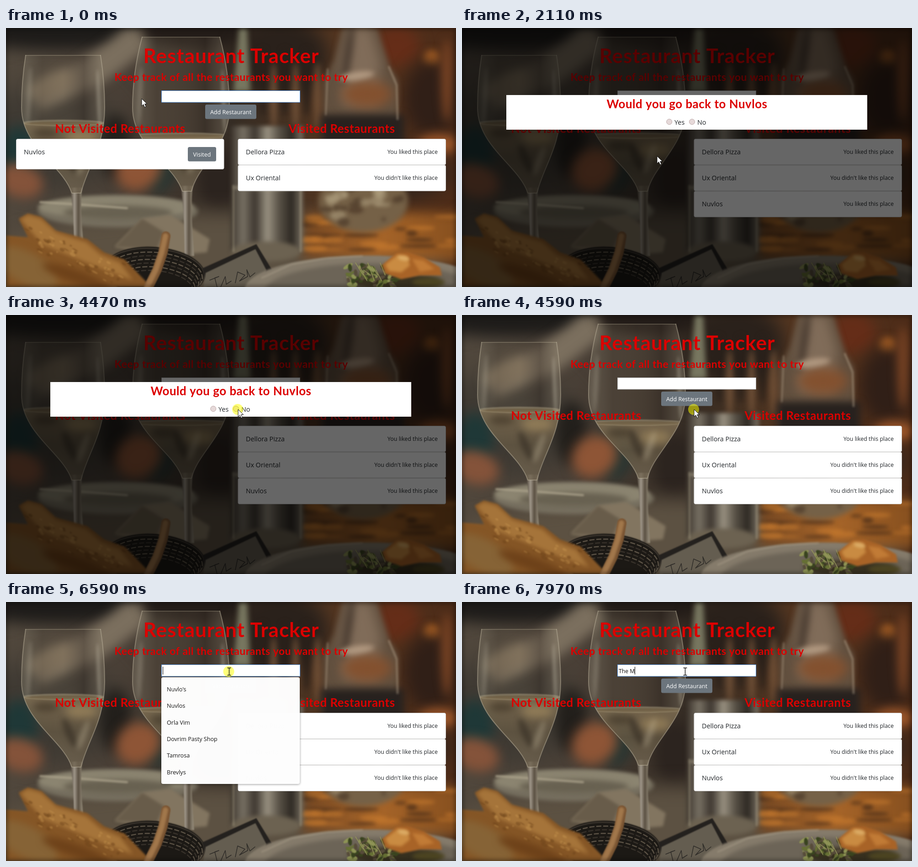
These frames come from a looping animation (985x568 px, 8 s). An HTML page with a canvas:

```html
<!DOCTYPE html>
<html lang="en">
<head>
<meta charset="utf-8">
<title>Restaurant Tracker</title>
<style>
html, body { margin: 0; width: 100%; height: 100%; overflow: hidden; background: #2b2621; }
canvas { display: block; }
</style>
</head>
<body>
<canvas id="stage" width="985" height="568"></canvas>
<script>
const W = 985, H = 568, LOOP = 8000;
const ctx = document.getElementById('stage').getContext('2d');
const DISPLAY = 'Lato, sans-serif', SANS = '"Open Sans", sans-serif';
const RED = '#dc0000', INK = '#212529';

// ---------- backdrop ----------
const photo = document.createElement('canvas');
photo.width = W; photo.height = H;
const g = photo.getContext('2d');

const blur = b => { g.filter = b ? `blur(${b}px)` : 'none'; };

function blob(x, y, rx, ry, color, b = 0, rot = 0) {
  blur(b);
  g.fillStyle = color;
  g.beginPath();
  g.ellipse(x, y, rx, ry, rot, 0, 7);
  g.fill();
}

function trace(str) {
  const p = str.split(' ').map(s => s.split(',').map(Number));
  g.beginPath();
  p.forEach(([x, y]) => g.lineTo(x, y));
}

function poly(str, color, b = 0) {
  blur(b);
  trace(str);
  g.fillStyle = color;
  g.fill();
}

function line(str, color, w, b = 0) {
  blur(b);
  trace(str);
  g.strokeStyle = color;
  g.lineWidth = w;
  g.lineCap = g.lineJoin = 'round';
  g.stroke();
}

function ramp(x0, y0, x1, y1, ...colors) {
  const r = g.createLinearGradient(x0, y0, x1, y1);
  colors.forEach((c, i) => r.addColorStop(i / (colors.length - 1), c));
  return r;
}

function random(seed) {
  return () => (seed = seed * 16807 % 2147483647) / 2147483647;
}

function glass(cx, top, rim, wide, mid, sx, base, foot, level) {
  blur(1);
  g.fillStyle = ramp(sx - 12, 0, sx + 14, 0, '#4b4236', '#a0978a', '#5a5042', '#8e8574');
  g.beginPath();
  g.moveTo(sx - 13, base - 12);
  g.quadraticCurveTo(sx - 5, base + 30, sx - 4, foot);
  g.lineTo(sx + 17, foot);
  g.quadraticCurveTo(sx + 8, base + 30, sx + 14, base - 12);
  g.fill();

  const bowl = new Path2D();
  bowl.moveTo(cx - rim, top);
  bowl.quadraticCurveTo(cx - wide, (top + mid) / 2, cx - wide, mid);
  bowl.bezierCurveTo(cx - wide, mid + 85, sx - 28, base - 60, sx - 9, base);
  bowl.lineTo(sx + 11, base);
  bowl.bezierCurveTo(sx + 26, base - 60, cx + wide, mid + 85, cx + wide, mid);
  bowl.quadraticCurveTo(cx + wide, (top + mid) / 2, cx + rim, top);
  blur(0);
  g.save();
  g.clip(bowl);
  g.fillStyle = ramp(cx - wide, 0, cx + wide, 0,
    'rgba(140,132,114,.4)', 'rgba(90,80,66,.35)', 'rgba(110,98,80,.2)', 'rgba(60,50,42,.4)', 'rgba(150,140,120,.4)');
  g.fillRect(0, 0, W, H);
  g.fillStyle = ramp(0, level, 0, base, 'rgba(128,110,82,.8)', 'rgba(98,86,66,.8)', 'rgba(116,104,84,.7)');
  g.fillRect(0, level, W, H);
  blob(cx + 40, level + 32, 34, 15, 'rgba(176,150,102,.55)', 9);
  blob(cx - 38, level + 22, 28, 10, 'rgba(58,48,34,.6)', 8);
  blob(sx - 14, base - 75, 9, 34, 'rgba(48,40,32,.55)', 6, -.4);
  blob(sx + 16, base - 70, 7, 34, 'rgba(190,178,150,.4)', 6, .35);
  blob(cx, level, wide, 7, 'rgba(180,166,134,.5)', 1);
  blob(cx, level + 1, wide - 8, 4, 'rgba(108,92,66,.8)', 1);
  g.restore();
  blur(.7);
  g.strokeStyle = 'rgba(185,176,154,.5)';
  g.lineWidth = 2;
  g.stroke(bowl);
  blob(cx - wide + 16, mid - 25, 5, 65, 'rgba(205,200,180,.25)', 4, .05);
  blob(cx + wide - 13, mid - 15, 4, 70, 'rgba(215,210,190,.3)', 3, -.04);
  line(`${cx - rim},${top} ${cx + rim},${top}`, 'rgba(195,185,160,.3)', 2, .7);
}

function room() {
  g.fillStyle = ramp(0, 0, W, 0, '#51483d', '#4a4037', '#352c24', '#553620', '#4c2b18');
  g.fillRect(0, 0, W, H);
  blob(110, 5, 230, 42, '#1d1b19', 16);
  blob(95, 240, 160, 120, '#3f3a33', 25);
  poly('330,0 300,55 215,118 70,185 65,140 130,95 225,30 260,0', '#7b6f5e', 12);
  blob(100, 125, 55, 26, '#85755f', 12, -.4);
  blob(415, 8, 120, 35, '#231c18', 12);
  blob(28, 270, 42, 55, '#1f3837', 14);
  blob(330, 300, 40, 60, '#243532', 14);
  blob(240, 260, 35, 70, '#221f1b', 14);
  blob(30, 335, 52, 36, '#84533a', 12, .3);
  blob(290, 310, 52, 45, '#8e5536', 13, -.6);
  blob(465, 330, 45, 70, '#2c241f', 14);
  blob(600, 65, 105, 85, '#2a211b', 18);
  poly('528,0 510,0 498,140 535,140', '#77765f', 6);
  for (let i = 0; i < 6; i++)
    blob(562 + i * 24, 120 + i % 2 * 30, 7, 75, i % 2 ? '#735339' : '#29201a', 7);
  blob(855, 40, 50, 45, '#652d18', 15);
  blob(932, 67, 17, 18, '#b16425', 8);
  blob(930, 155, 60, 85, '#301f17', 18);
  blob(965, 115, 12, 90, '#7a4424', 10);
  blob(945, 255, 45, 22, '#9d572a', 11);
  blob(845, 320, 130, 60, '#34251c', 16);
}

function tableTop() {
  blob(470, 500, 500, 95, '#5c5142', 20);
  g.fillStyle = ramp(640, 0, W, 0, '#704522', '#a76529', '#87501f');
  blur(12);
  g.fillRect(650, 405, 360, 105);
  const rnd = random(17);
  for (let i = 0; i < 26; i++)
    blob(650 + rnd() * 335, 405 + rnd() * 85, 12 + rnd() * 35, 3 + rnd() * 4,
      i % 3 ? 'rgba(205,126,48,.55)' : 'rgba(62,39,23,.65)', 4);
  blob(245, 402, 175, 35, '#777060', 5);
  blob(240, 393, 170, 24, '#8b8470', 4);
  blob(245, 405, 120, 16, '#686151', 6);
  line('75,382 160,387 265,395', '#aaa18a', 4, 2);
  poly('238,480 298,418 360,410 446,463 440,492 340,500', '#827560', 3);
  poly('298,418 345,447 330,486 238,480', '#685c4a', 3);
}

function bottleAndMill() {
  poly('735,0 812,0 840,85 858,115 858,300 695,300 695,115 718,70', '#62503f', 6);
  poly('752,0 798,0 820,75 812,170 737,170 735,70', '#806c59', 12);
  blob(748, 60, 9, 70, '#4a3c31', 8, .15);
  blob(790, 145, 55, 30, '#83512f', 12);
  blob(768, 105, 38, 9, '#b09880', 6, -.15);
  g.fillStyle = '#27211e';
  blur(8);
  g.fillRect(690, 190, 182, 112);
  line('704,90 700,190', 'rgba(185,170,145,.5)', 3, 2);
  line('838,85 855,125 857,200', 'rgba(185,170,145,.5)', 4, 2);
  blob(782, 380, 98, 68, '#756147', 6);
  const rnd = random(5);
  for (let i = 0; i < 28; i++)
    blob(700 + rnd() * 165, 325 + rnd() * 110, 5 + rnd() * 13, 3 + rnd() * 9,
      i % 2 ? 'rgba(189,174,140,.45)' : 'rgba(66,47,32,.55)', 4);
  g.fillStyle = ramp(492, 0, 652, 0, '#3b332c', '#777063', '#3e3730', '#989080', '#575045', '#2e2923', '#82796a');
  blur(4);
  g.fillRect(492, 215, 158, 275);
  blob(570, 490, 76, 22, '#6c6251', 5);
  blob(574, 350, 78, 7, 'rgba(180,170,145,.5)', 3);
  for (const x of [498, 645]) line(`${x},345 ${x},490`, 'rgba(188,178,150,.5)', 3, 2);
}

function food() {
  // basket
  blob(325, 535, 111, 55, '#1c1915', 1, .08);
  for (let i = 0; i < 7; i++) {
    blur(0);
    g.strokeStyle = i % 2 ? '#5b5245' : '#37312a';
    g.lineWidth = 2.5;
    g.setLineDash(i ? [9, 6] : []);
    g.lineDashOffset = i * 7;
    g.beginPath();
    g.ellipse(325, 535 + i * 6, 109 - i * 4, 51 - i * 2, .08, 3.3, 6.7);
    g.stroke();
  }
  g.setLineDash([]);
  // menu card
  poly('430,527 548,474 582,530 572,568 440,568', '#24211e', 1);
  poly('437,537 546,485 570,531 555,568 432,568', '#645d50', 1);
  line('446,553 466,545 457,548 462,568', '#302d29', 1.5);
  line('470,568 480,545 482,562 493,555', '#302d29', 1.5);
  line('502,559 507,535 523,542 511,555 529,545 527,530 534,546 545,537', '#302d29', 1.5);
  // bread
  poly('28,418 48,407 78,415 108,444 178,463 215,492 260,508 318,568 0,568 0,455 48,459', '#855626', 2);
  poly('32,420 48,410 76,418 110,449 176,470 207,497 250,515 278,553 215,530 80,475', '#a5743a', 4);
  blob(45, 526, 75, 34, '#866336', 8, .5);
  blob(155, 546, 80, 15, '#6d4119', 8, .35);
  const rnd = random(9);
  for (let i = 0; i < 55; i++) {
    const u = rnd();
    blob(45 + u * 215, 432 + u * 85 + rnd() * 55, 2 + rnd() * 6, 1 + rnd() * 3,
      i % 2 ? 'rgba(200,150,80,.4)' : 'rgba(110,67,25,.5)', 1.5, .5);
  }
  line('350,456 344,492 331,530 312,568', '#795432', 20, 1);
  line('349,456 341,492 328,530 309,568', '#a1774b', 12, 2);
  // plate with salad
  blob(790, 575, 268, 76, '#857b6b', 2);
  blob(800, 580, 235, 64, '#6c6457', 5);
  line('560,548 625,518 700,505 780,500', 'rgba(186,176,154,.45)', 3, 2);
  blob(850, 556, 100, 18, '#37301f', 6);
  for (let i = 0; i < 65; i++) {
    const x = 748 + rnd() * 108;
    blob(x, 522 + rnd() * 43, 3 + rnd() * 9, 2 + rnd() * 4,
      ['#39431f', '#667034', '#8e9455', '#574c3a'][i % 4], 1, rnd() * 3);
  }
  for (let i = 0; i < 7; i++)
    line(`${765 + i * 9},${515 + i % 3 * 8} ${782 + i * 8},${542 + i % 2 * 12}`, '#92925a', 1.5);
  poly('823,520 855,493 880,492 915,503 950,525 954,543 905,543 865,551 830,538', '#a86327', 2);
  poly('830,519 858,497 878,500 884,521 865,536 838,533', '#c98b42', 3);
  poly('888,506 914,510 938,529 906,535', '#c17b36', 3);
  blob(870, 505, 13, 5, '#dcac66', 3, .2);
  blob(925, 558, 36, 10, '#4d4522', 4);
}

function paintPhoto() {
  room();
  tableTop();
  bottleAndMill();
  glass(125, 60, 82, 91, 175, 153, 362, 475, 208);
  glass(383, 20, 85, 106, 175, 395, 358, 500, 236);
  food();
  blur(4);
  g.strokeStyle = 'rgba(0,0,0,.5)';
  g.lineWidth = 5;
  g.strokeRect(0, 0, W, H);
}

// ---------- page ----------
function text(str, x, y, size, color = INK, align = 'left', weight = 400) {
  ctx.font = `${weight} ${size}px ${SANS}`;
  ctx.textAlign = align;
  ctx.fillStyle = color;
  ctx.fillText(str, x, y);
}

function heading(str, x, y, size) {
  ctx.save();
  ctx.font = `bold ${size}px ${DISPLAY}`;
  ctx.letterSpacing = size * .022 + 'px';
  ctx.textAlign = 'center';
  ctx.fillStyle = RED;
  ctx.fillText(str, x, y);
  ctx.restore();
}

function box(x, y, w, h, r, fill, stroke) {
  ctx.beginPath();
  ctx.roundRect(x, y, w, h, r);
  ctx.fillStyle = fill;
  ctx.fill();
  if (!stroke) return;
  ctx.strokeStyle = stroke;
  ctx.lineWidth = 1;
  ctx.stroke();
}

function button(label, x, y, w, h, hover) {
  box(x, y, w, h, 3.5, hover ? '#565c63' : '#6c757d');
  text(label, x + w / 2, y + h / 2 + 4.8, 12.5, '#fff', 'center');
}

function visitedCard(i, name, liked) {
  const y = 243.5 + i * 57.2;
  box(508, y, 454.5, 56.5, 3, '#fff', '#d5d5d5');
  text(name, 525, y + 33.5, 14.3);
  text(liked ? 'You liked this place' : "You didn't like this place", 945, y + 32, 12.45, INK, 'right');
}

// the caret shows for half a second after each of these moments
const CARET_ON = [220, 1210, 6590, 7210, 7350, 7600, 7970];

function input(t) {
  const focus = t < 1970 || t >= 6590;
  box(340.5, 137.5, 303, 25.5, 0, '#fff', focus ? '#4f8fe0' : '#aaa');
  const typed = t < 7210 ? '' : t < 7350 ? 'T' : t < 7600 ? 'The' : t < 7970 ? 'The ' : 'The M';
  text(typed, 343, 155.5, 12.2, '#111');
  if (CARET_ON.some(on => t >= on && t < on + 495)) {
    ctx.fillStyle = '#000';
    ctx.fillRect(Math.round(343 + ctx.measureText(typed).width), 142, 1, 17);
  }
}

const ENTRIES = ["Nuvlo's", 'Nuvlos', 'Orla Vim', 'Dovrim Pasty Shop', 'Tamrosa', 'Brevlys'];

function suggestions(t) {
  if (t < 6590 || t >= 7970) return;
  const rows = t < 7210 ? ENTRIES : ['The Quillon'];
  const age = t - (t < 7210 ? 6590 : 7210);
  ctx.save();
  ctx.globalAlpha = age < 130 ? .985 : 1;
  ctx.shadowColor = 'rgba(0,0,0,.4)';
  ctx.shadowBlur = 5;
  ctx.shadowOffsetY = 1;
  box(340, 165, 303, 52 + (rows.length - 1) * 36.4, 4, '#fff');
  ctx.shadowColor = 'transparent';
  rows.forEach((r, i) => text(r, 352, 195.8 + i * 36.4, 12.6, '#111', 'left', 500));
  ctx.restore();
}

function radio(x, hover) {
  ctx.beginPath();
  ctx.arc(x, 205.7, 6, 0, 7);
  ctx.fillStyle = '#e6d9d9';
  ctx.fill();
  ctx.strokeStyle = hover ? '#8f8080' : '#bda9a9';
  ctx.lineWidth = 1;
  ctx.stroke();
}

function modal(x, y) {
  ctx.fillStyle = 'rgba(0,0,0,.6)';
  ctx.fillRect(0, 0, W, H);
  ctx.fillStyle = '#fff';
  ctx.fillRect(97, 147, 790, 76);
  heading('Would you go back to Nuvlos', 492.5, 176, 25.8);
  radio(453.7);
  text('Yes', 465, 212, 14.4);
  radio(503.5, Math.hypot(x - 503.5, y - 205.7) < 7);
  text('No', 515, 212, 14.4);
}

// ---------- pointer ----------
const PATH = [
  [0, 297, 155, 'arrow'], [720, 311, 165, 'arrow'], [840, 347, 194, 'arrow'], [960, 385, 228, 'arrow'],
  [1090, 410, 255, 'arrow'], [1210, 420, 269, 'hand'], [1350, 425, 279, 'hand'], [1470, 427, 284, 'hand'],
  [1600, 427, 282, 'hand'], [1720, 427, 281, 'hand'], [2110, 427, 281, 'arrow'], [3100, 437, 269, 'arrow'],
  [3220, 462, 243, 'arrow'], [3350, 482, 225, 'arrow'], [3500, 488, 220, 'arrow'], [3620, 494, 215, 'arrow'],
  [3740, 500, 211, 'arrow'], [3850, 504, 209, 'arrow'], [3970, 507, 208, 'arrow'], [4090, 508, 207, 'arrow'],
  [5590, 506, 201, 'arrow'], [5710, 501, 183, 'hand'], [5850, 494, 172, 'hand'], [5970, 489.5, 156, 'beam'],
  [6090, 488.5, 152.5, 'beam']
];

const SHAPES = {
  arrow: new Path2D('M0 0V16.2L3.8 12.6L6.6 18.8L9.4 17.6L6.7 11.5H11.7Z'),
  hand: new Path2D('M-1.6 1.2Q0-.8 1.6 1.2V7Q3.4 5.8 4.5 7.5Q6.3 6.6 7 8.4Q9.3 7.6 9.6 10V14Q8.7 16.5 7.7 20H-1.4Q-3.2 16-6.3 12.5Q-6.7 10-4.4 10.3L-1.6 13Z'),
  beam: new Path2D('M-4-8H-1Q0-8 0-7Q0-8 1-8H4M0-7V7M-4 8H-1Q0 8 0 7Q0 8 1 8H4')
};

function pointer(x, y, kind) {
  ctx.save();
  ctx.translate(x, y);
  ctx.lineWidth = kind === 'beam' ? 1.4 : 1;
  ctx.strokeStyle = '#111';
  ctx.fillStyle = '#fff';
  if (kind !== 'beam') ctx.fill(SHAPES[kind]);
  ctx.stroke(SHAPES[kind]);
  if (kind === 'hand') ctx.stroke(new Path2D('M1.6 7V11M4.5 8V11.5M7 9V12'));
  ctx.restore();
}

function clickSpot(t, x, y) {
  if (![1970, 4470, 6590].some(at => t >= at && t < at + 130)) return;
  ctx.beginPath();
  ctx.arc(x - 1, y, 12, 0, 7);
  ctx.fillStyle = 'rgba(255,255,0,.52)';
  ctx.fill();
}

function draw(t) {
  const [, x, y, kind] = PATH.filter(p => p[0] <= t).pop();
  const asking = t >= 2110 && t < 4590;
  ctx.drawImage(photo, 0, 0);
  heading('Restaurant Tracker', 493, 77, 44);
  heading('Keep track of all the restaurants you want to try', 493, 116, 22.9);
  heading('Not Visited Restaurants', 250, 230, 25.8);
  heading('Visited Restaurants', 735, 230, 25.8);
  input(t);
  button('Add Restaurant', 436, 168, 112, 31.5, kind === 'hand' && y < 200);
  if (t < 2110) {
    box(22.5, 243.5, 454.5, 66, 3, '#fff', '#d5d5d5');
    text('Nuvlos', 39, 277, 14.4);
    button('Visited', 398, 261, 62, 31.5, kind === 'hand');
  }
  visitedCard(0, 'Dellora Pizza', true);
  visitedCard(1, 'Ux Oriental', false);
  if (t >= 2110) visitedCard(2, 'Nuvlos', asking);
  suggestions(t);
  if (asking) modal(x, y);
  if (!asking || t >= 4470) clickSpot(t, x, y);
  pointer(x, y, kind);
}

paintPhoto();
const start = performance.now();
function tick() {
  draw((performance.now() - start) % LOOP);
  requestAnimationFrame(tick);
}
tick();
</script>
</body>
</html>
```
